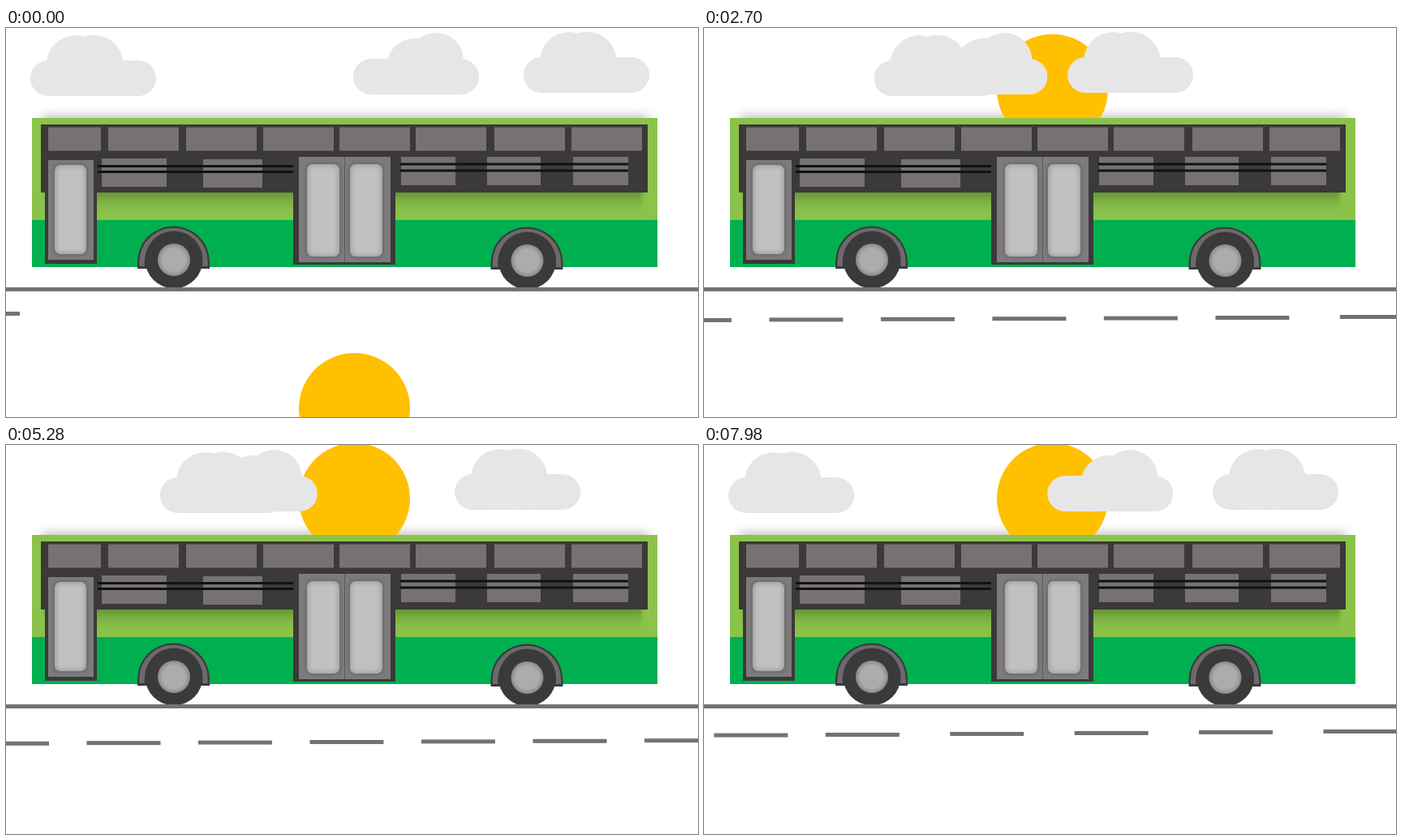
These frames come from a looping animation (853x480 px, 8 s). An HTML page:

```html
<!DOCTYPE html>
<html lang="en">
<head>
<meta charset="utf-8">
<title>City bus</title>
<style>
  html, body { margin: 0; width: 100%; height: 100%; overflow: hidden; background: #fff; }
  svg { display: block; width: 100%; height: 100%; }
</style>
</head>
<body>
<svg viewBox="0 0 853 480">
  <defs>
    <filter id="soft" x="-20%" y="-20%" width="140%" height="140%"><feGaussianBlur stdDeviation="2"/></filter>
    <filter id="glow" x="-10%" y="-30%" width="120%" height="160%"><feGaussianBlur stdDeviation="6"/></filter>
    <linearGradient id="shade" x2="0" y2="1">
      <stop offset="0" stop-color="#4d7424" stop-opacity=".75"/>
      <stop offset="1" stop-color="#8bc34a" stop-opacity="0"/>
    </linearGradient>
    <radialGradient id="hub">
      <stop offset=".7" stop-color="#adabab"/>
      <stop offset="1" stop-color="#8a8888"/>
    </radialGradient>
    <g id="cloud">
      <rect y="32" width="155" height="44" rx="22"/>
      <circle cx="56" cy="37" r="36"/>
      <circle cx="78" cy="37" r="36.5"/>
    </g>
    <g id="cloudFlipped">
      <rect y="32" width="155" height="44" rx="22"/>
      <circle cx="76" cy="41" r="34.5"/>
      <circle cx="102" cy="34" r="34"/>
    </g>
    <g id="wheel">
      <path d="M-44.5 11V3a44.5 44.5 0 0 1 89 0v8z" fill="#3a3a3a"/>
      <path d="M-39 8V3a39 39 0 0 1 78 0v5" fill="none" stroke="#6c6a6a" stroke-width="6.5"/>
      <circle cx=".5" r="35.5" fill="#3a3a3a"/>
      <circle cx=".5" r="20" fill="url(#hub)"/>
    </g>
    <clipPath id="aboveRoof"><path d="M0 60H853V111H0z"/></clipPath>
  </defs>

  <g clip-path="url(#aboveRoof)">
    <rect x="44" y="107" width="748" height="40" fill="#000" opacity=".22" filter="url(#glow)"/>
  </g>
  <circle id="sun" cx="429.5" r="68.5" fill="#ffc000"/>
  <g fill="#e7e6e6">
    <use id="cloud1" href="#cloud"/>
    <use id="cloud2" href="#cloudFlipped"/>
    <use id="cloud3" href="#cloud"/>
  </g>

  <rect x="32" y="111" width="771" height="127" fill="#8bc34a"/>
  <rect x="48" y="199" width="736" height="34" fill="url(#shade)" filter="url(#soft)"/>
  <rect x="32" y="237" width="771" height="58" fill="#00b050"/>
  <rect x="43" y="119" width="748" height="84" fill="#3b3939"/>
  <g id="windows" fill="#767273"></g>
  <path d="M113 170.500H354M113 177.500H354M486 168H767M486 176H767" stroke="#111" stroke-width="3"/>

  <g fill="#3b3939">
    <rect x="48" y="161" width="64" height="130"/>
    <rect x="354" y="158" width="126" height="134"/>
  </g>
  <g fill="#7d7b7c">
    <rect x="52" y="163" width="56" height="123"/>
    <rect x="361" y="159" width="113" height="130"/>
  </g>
  <path d="M417.500 159V289" stroke="#5c5a5a"/>
  <g id="panels"></g>

  <use href="#wheel" x="206.500" y="286"/>
  <use href="#wheel" x="642" y="287"/>
  <path d="M0 322.500H853" stroke="#767171" stroke-width="5"/>
  <g id="lane" fill="#767171"></g>
</svg>
<script>
const LOOP = 8000;
const byId = id => document.getElementById(id);

function addRect(parent, x, y, width, height, extra = {}) {
  const rect = document.createElementNS('http://www.w3.org/2000/svg', 'rect');
  for (const [key, value] of Object.entries({ x, y, width, height, ...extra })) rect.setAttribute(key, value);
  byId(parent).append(rect);
}

for (const [left, right] of [[52, 117], [126, 213], [222, 309], [317, 404], [411, 498], [505, 592], [602, 689], [697, 784]])
  addRect('windows', left, 122.5, right - left, 29);
for (const [left, right, top] of [[118, 198, 161], [243, 316, 162], [487, 554, 159], [593, 659, 159], [699, 767, 159]])
  addRect('windows', left, top, right - left, 35);

for (const [x, y, width, height] of [[60, 169, 39, 110], [371, 168, 40, 114], [424, 168, 40, 114]]) {
  addRect('panels', x - 1, y - 1, width + 2, height + 2, { rx: 7, fill: '#636162', filter: 'url(#soft)' });
  addRect('panels', x, y, width, height, { rx: 7, fill: '#a9a7a8' });
  addRect('panels', x + 3, y + 3, width - 6, height - 6, { rx: 5, fill: '#c2c0c1', filter: 'url(#soft)' });
}

// Lane marks run from the leading one backwards, each a little lower.
for (let i = 0; i < 25; i++) {
  const first = Math.min(i, 5), rest = i - first;
  addRect('lane', -153.4 * first - 137.5 * rest, 350 + first + 0.6 * rest, 91, 5);
}

// Constant acceleration, then constant deceleration.
function ease(time, start, duration) {
  const u = Math.min(1, Math.max(0, (time - start) / duration));
  return u < 0.5 ? 2 * u * u : 1 - 2 * (1 - u) ** 2;
}

// There and back again, each leg lasting `leg` ms.
function swing(time, leg, start, duration) {
  const progress = ease(time % leg, start, duration);
  return Math.floor(time / leg) % 2 ? 1 - progress : progress;
}

const place = (id, x, y) => byId(id).setAttribute('transform', `translate(${x} ${y})`);

function draw(time) {
  byId('sun').setAttribute('cy', 469.5 - 403.5 * ease(time, 168, 2852));
  place('cloud1', 30 + 212 * swing(time, 3844, 247, 3390), 8);
  place('cloud2', 428 - 212 * swing(time, 4360, 269, 3750), 6);
  place('cloud3', 638 - 212.5 * ease(time % 3627, 203, 3246), 4);
  place('lane', -74 + 3278 * ease(time % 5696, 382, 4895), 0);
}

function frame() {
  draw(performance.now() % LOOP);
  requestAnimationFrame(frame);
}
frame();
</script>
</body>
</html>
```
